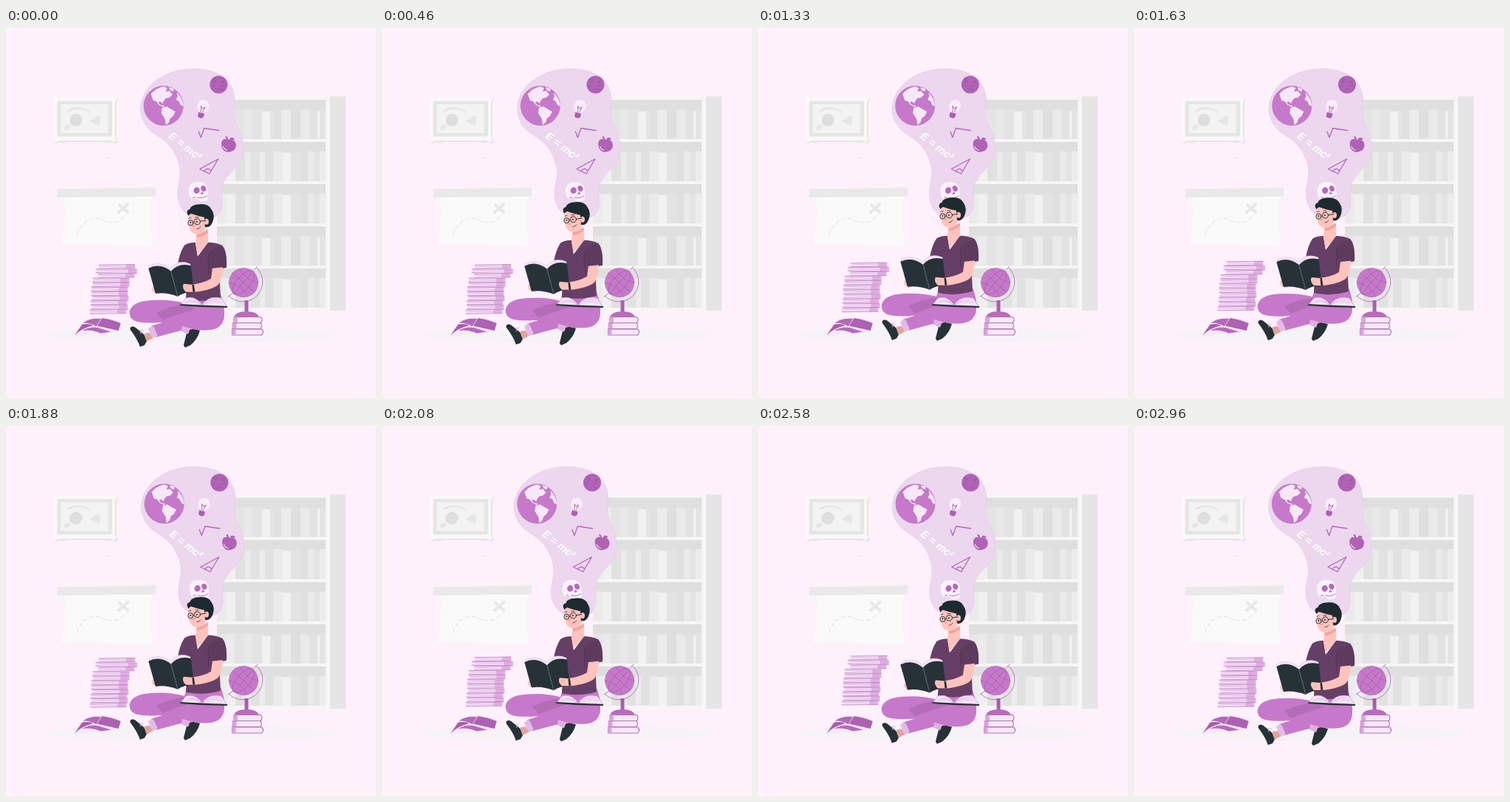
An HTML page that plays this animation: 500x500 px, repeating every 3000 ms.

```html
<!DOCTYPE html>
<html lang="en">
<head>
<meta charset="utf-8">
<title>Reading and thinking</title>
<style>
  html, body { margin: 0; width: 100%; height: 100%; overflow: hidden; background: #fff1fb; }
  svg { display: block; width: 100vw; height: 100vh; }
  text { font: italic bold 14.5px "Liberation Sans", Arial, sans-serif; }
  .line { fill: none; stroke-linecap: round; stroke-linejoin: round; }
</style>
</head>
<body>
<svg viewBox="0 0 500 500">
  <path d="M38 54.500H458M38 54.500V338" class="line" stroke="#fbeef7" stroke-width=".6"/>
  <ellipse cx="250.500" cy="415" rx="192" ry="11" fill="#f5f3f5"/>

  <g id="bookcase"></g>

  <g id="picture">
    <path id="frame" d="M64 94Q68 92 71 95H143Q147 91 150 95Q151 98 148 101V147Q152 151 148 155Q145 156 142 153Q136 156 130 153H82Q76 156 72 153Q67 157 64 153Q63 150 66 147V101Q62 97 64 94Z" fill="#e8e6e7" transform="translate(1 1)"/>
    <use href="#frame" id="frame-face" transform="translate(-1 -1)" opacity="0"/>
    <path d="M64 94Q68 92 71 95H143Q147 91 149 95Q150 98 147 101V147Q150 151 147 154Q145 155 142 152H72Q67 156 64 153Q63 150 66 147V101Q62 97 64 94Z" fill="#faf9fa"/>
    <path d="M69 98.500H143.500V146.500H69Z" fill="#e5e5e5"/>
    <path d="M74 103H138.500V142H74Z" fill="#f3f3f3"/>
    <circle cx="94.500" cy="124.500" r="8.500" fill="#dedede"/>
    <path d="M112 126L127 117V132.500Z" fill="#e6e6e6"/>
    <path class="line" d="M84 112Q98 104 112 113" stroke="#e6e6e6" stroke-width="2.500"/>
    <ellipse cx="83" cy="134" rx="4.500" ry="3" fill="#e6e6e6" transform="rotate(-25 83 134)"/>
  </g>

  <g id="map">
    <path class="line" d="M97 217L138 175L180 216" stroke="#f9eff6" stroke-width=".8"/>
    <path d="M136 174.500L140 175.500" stroke="#ddd5da"/>
    <path d="M79 228H197Q193 262 199 296Q180 292 155 294Q110 290 75 293Q81 260 79 228Z" fill="#fafafa"/>
    <path d="M69 217.500L202 215.500V227.500L69 229Z" fill="#e9e9e9"/>
    <path class="line" d="M96 279C103 259 117 254 128 259S152 267 162 252" stroke="#e6e6e6" stroke-width="1.400" stroke-dasharray="5 4"/>
    <path d="M152 238L166 250M166 237L151 250" stroke="#e8e8e8" stroke-width="4"/>
  </g>

  <g id="thought">
    <path d="M182 114C179 83 210 55 254 55C287 55 309 71 309 97C307 122 309 125 314 135C320 146 322 158 320 169C317 188 302 192 294 209C289 221 294 231 292 241Q290 253 280 256H255C240 252 232 240 232 224C232 212 237 202 235 189C232 172 224 159 210 149C197 141 185 133 182 114Z" fill="#ecd7ee" stroke="#dfc7e1" stroke-width=".5"/>

    <circle cx="213" cy="105" r="27" fill="#c679ca"/>
    <g fill="#f7e8f8">
      <path d="M196 89Q203 81 213 79L218 81L216 86L221 85L225 90L221 94L216 95L213 99L212 102L208 99L206 101L209 104L214 105L213 107L207 104L203 99L199 98Z"/>
      <path d="M211 108L217 106L222 109L229 113L226 119L222 122L220 128L216 131L215 123L210 115Z"/>
      <path d="M231 87Q239 95 240 106L236 104L234 99L230 97L232 92Z"/>
      <path d="M220 80L227 82L226 86L222 84Z"/>
    </g>

    <circle cx="287.500" cy="76.500" r="12" fill="#b062b5"/>
    <g class="line" stroke="#9d55a2" stroke-width="1">
      <circle cx="282" cy="71" r="1.800"/><circle cx="293" cy="73" r="1.300"/>
      <path d="M278 80L282 77M285 84L288 82L292 84M290 79L295 77"/>
    </g>

    <g transform="rotate(14 266 108)">
      <path d="M262 114Q258 109 258 105A8 8 0 0 1 274 105Q274 109 270 114Z" fill="#f9edfa"/>
      <path class="line" d="M265 114L263 106L266 109L269 106L267 114" stroke="#b878bc"/>
      <path d="M262 115H270V120L268 122H264L262 120Z" fill="#ad5fb3"/>
    </g>

    <g class="line" stroke="#b565bb" stroke-width="1.300">
      <path d="M260.500 140L263.500 148L268 135.500L288 138.500"/>
      <path d="M262 190.500L287 177L275 197ZM268 194Q270 190 274 190.500L277 193"/>
    </g>

    <g fill="#b062b5">
      <path d="M300 151Q294 148 291.500 154Q290 161 295 166Q299 169 304 167Q311 165 311 158Q310 149 300 151Z"/>
      <path d="M299 151Q296 148 297 146L299 147L301 151Z"/>
      <path d="M302 150Q305 146 309 150Q306 153 302 150Z"/>
    </g>
    <path class="line" d="M293.500 160Q295 164.500 299 165" stroke="#efd8f1" stroke-width="1.200"/>

    <g id="skull">
      <path d="M247 219Q248 208 260 208Q272 208 273 219L273 231Q270 235 262 234L258 230Q252 233 249 229Q247 225 247 219Z" fill="#faf1fb"/>
      <g fill="#b668bc">
        <ellipse cx="258" cy="219.500" rx="4" ry="4.400" transform="rotate(25 258 219)"/>
        <ellipse cx="267" cy="217" rx="3.400" ry="4" transform="rotate(-25 267 217)"/>
        <path d="M265 221L267.500 224L263 225Z"/>
      </g>
      <path class="line" d="M253 230L254 228L256 230M259 229Q266 231 272 227" stroke="#b668bc" stroke-width=".9"/>
    </g>
    <text transform="translate(219 147.500) rotate(38)" fill="#fff">E = mc²</text>
  </g>

  <g id="stack"></g>

  <g id="fallen">
    <path d="M92 417L103 398Q114 390 130 391Q144 393 155.500 398L152 410L141 412L128 415Q117 410 107 415Z" fill="#f7e7f8"/>
    <path d="M92.500 415.500L103 400.500Q112 399 118 402Q103 405 92.500 415.500Z" fill="#a85dad"/>
    <path d="M104 398.500Q113 391.500 128.500 393L122 403Q113 398 104 398.500Z" fill="#b468b9"/>
    <path d="M130 392Q144 394 155 399L152 409Q139 406 123 402.500Z" fill="#ad61b2"/>
    <path d="M103 409Q113 403 124 405L142 410.500L128 412.500Q115 407 103 409Z" fill="#b56abb"/>
  </g>

  <g id="globe">
    <circle cx="321" cy="344" r="20" fill="#c679ca"/>
    <g class="line" stroke="#a862ad" stroke-width=".9">
      <ellipse cx="321" cy="344" rx="9" ry="20" transform="rotate(42 321 344)"/>
      <path d="M334 329L308 359M306 331L336 357M316 325Q323 341 341 344M301 344Q320 347 326 363"/>
    </g>
    <path class="line" d="M336 326L340 322M339 324A26.500 26.500 0 1 1 301 362M300 363L307 358" stroke="#bd7cc1"/>
    <path d="M322.500 368H327.500V385H322.500Z" fill="#a85eae"/>
    <path d="M308 391Q310 383 325 383Q340 383 342 391Z" fill="#b86cbd"/>
  </g>

  <g id="reader">
    <path d="M187 413L194 412L199 419L190 424ZM242 405L252 402L254 411L245 412Z" fill="#e3a39a"/>
    <path d="M168 405Q171 402 175 405L187 415L190 424L187 429L181 431Q178 421 168 408Z" fill="#263238"/>
    <path d="M245 409L253 407L262 409Q259 421 249 429L242 432L240 429Z" fill="#263238"/>
    <path class="line" d="M180 408L186 413M182 413Q180 406 186 409M239 407L247 411M235 409Q240 405 244 412" stroke="#d9b6db" stroke-width=".9"/>
    <path d="M203 368Q220 367 241 372L245 360H290Q296 375 295 389Q294 405 278 408Q262 410 248 406L203 418L196 403L212 398Q185 400 174 396Q166 392 167 383Q171 368 203 368Z" fill="#c679ca"/>
    <path d="M203 385Q222 376 243 373L256 380Q232 387 212 395Z" fill="#b26db6"/>
    <path d="M238 403L249 406L246 414L237 410Z" fill="#dfb0e2"/>
    <path d="M192 406L199 403L205 416L198 420Z" fill="#e4bbe7"/>

    <path d="M240 318L236 337L222 343L198 350Q195 357 203 359L224 356L246 345Z" fill="#ffc3bd"/>
    <path d="M256 290Q246 290 241 294Q234 305 232 321L245 326L243 367Q267 372 290 365L288 326L298 324Q299 302 292 294Q284 290 273 290L259 309Z" fill="#663f66"/>
    <path d="M275 301Q271 315 274 324L288 326L298 324Q299 302 292 294Z" fill="#5d395d" opacity=".7"/>
    <path class="line" d="M274 305Q272 317 275 333" stroke="#4c2e4b" stroke-width=".7"/>
    <path d="M256 291L258 274H273V290L258.500 307Z" fill="#ffc3bd"/>
    <path d="M258 279Q267 279 272 272L273 277Q265 283 258 283Z" fill="#f2a49c"/>
    <path d="M248 251Q245 268 250 275Q256 281 263 278Q271 273 274 262L273 249Z" fill="#ffc3bd"/>
    <path d="M246.500 254Q242 247 248.500 245Q250 239 261 238.500Q274 237 278 246Q283 253 279 263Q275 271 269 269L268 256Q258 254 250 251Q248 252 246.500 254Z" fill="#1d2b31"/>
    <ellipse cx="271" cy="262" rx="3" ry="4" fill="#ffc3bd"/>
    <g class="line" stroke="#243038">
      <circle cx="249.500" cy="263.500" r="3.600"/><circle cx="258.500" cy="262" r="4"/>
      <path d="M262.500 261.500L270 260.500"/>
      <path d="M258 272Q261 272 263 269M247 257.500L250 256.500M256 256L260 256" stroke-width=".8"/>
    </g>
    <circle cx="249.500" cy="263" r=".9"/><circle cx="258" cy="262" r=".9"/>
    <ellipse cx="253.500" cy="268" rx="1.600" ry="1.200" fill="#f59b94"/>

    <path d="M193 322Q208 314 222 325Q233 312 249 319L253 356Q240 356 230 361Q216 355 204 360Z" fill="#f5e3f6" stroke="#d3acd6" stroke-width=".4"/>
    <path d="M192.500 325Q208 317 223 329L232 363Q217 357 202 359Z" fill="#263238"/>
    <path d="M223 329Q233 317 250 321.500L254 357Q240 357 232 363Z" fill="#263238"/>
    <path d="M223 329L232 363" stroke="#65717a" stroke-width="1.100" stroke-dasharray="2 1"/>
    <path d="M279 325L293 323.500Q292 340 287 347Q279 354 256 357L243 357Q237 351 240 346L251 347Q267 345 277 339Z" fill="#ffc3bd"/>
    <path class="line" d="M240 350L247 349M241 353L247 352" stroke="#eda59c" stroke-width=".6"/>
    <path d="M251.500 347L254 347L255.500 357L252.500 357Z" fill="#263238"/>
  </g>

  <g id="lap-book">
    <path d="M236 374L243 365Q255 361 265 374Q274 361 291 365L298 376Z" fill="#f4e4f6" stroke="#c892cc" stroke-width=".6"/>
    <path class="line" d="M242 371Q255 367 264 374M247 368Q257 367 264 374M266 374Q275 367 292 371M266 374Q274 365 289 367" stroke="#d3a8d6" stroke-width=".6"/>
    <path d="M235.500 373L263 374.500L299 376V378L263 377L235.500 375Z" fill="#263238"/>
  </g>
</svg>

<script>
  const LOOP = 3000, FPS = 24, STEP = 1000 / FPS;
  const byId = id => document.getElementById(id);
  const rect = (x, y, w, h, fill) =>
    `<rect x="${x}" y="${y}" width="${w}" height="${h}" fill="${fill}"/>`;

  // Each volume: left edge, shade, gap above it.
  const rows = {
    a: [[285, '#e6e6e6', 1], [297, '#ebebeb', 0], [309, '#e4e4e4', 1], [321, '#e8e8e8', 0],
        [333, '#e3e3e3', 0], [346, '#f2f2f2', 3], [357, '#e4e4e4', 2], [361, '#e0e0e0', 0],
        [372, '#ececec', 1], [385, '#dfdfdf', 0], [398, '#eaeaea', 1], [410, '#e2e2e2', 0],
        [421, '#f3f3f3', 2], [424, '#e4e4e4', 0]],
    b: [[285, '#ebebeb', 0], [298, '#f0f0f0', 1], [310, '#e1e1e1', 0], [323, '#eaeaea', 1],
        [331, '#e2e2e2', 0], [343, '#ececec', 1], [350, '#e1e1e1', 0], [361, '#eaeaea', 0],
        [374, '#f2f2f2', 2], [385, '#e3e3e3', 0], [399, '#dfdfdf', 1], [408, '#eaeaea', 0],
        [416, '#e4e4e4', 1], [424, '#ececec', 0]]
  };

  function drawBookcase() {
    let out = rect(285, 92.5, 153, 289.5, '#f7f5f6') + rect(438, 92.5, 21, 289.5, '#e5e5e5');
    [...'abbab'].forEach((kind, i) => {
      const top = 97 + i * 57, height = 53;
      out += rect(285, top, 147, height, '#dfdfdf');
      rows[kind].forEach(([x, shade, gap], n, all) => {
        const end = n + 1 < all.length ? all[n + 1][0] : 432;
        out += rect(x, top + 12.5 + gap, end - x, height - 12.5 - gap, shade);
      });
    });
    byId('bookcase').innerHTML = out;
  }

  function drawStack() {
    const lefts = [125, 121, 124, 117, 117, 115, 115, 116, 114, 115, 113];
    byId('stack').innerHTML = lefts.map((x, i) => {
      const w = i === 1 ? 56 : 49.5, y = 319.5 + i * 6.1;
      const tilt = i % 2 ? 0.8 : -0.6;
      return `<g transform="translate(${x} ${y}) rotate(${tilt} 25 3)">` +
        rect(0, 0, w, 5.7, '#f3e1f5') + rect(w - 12, 0, 12, 5.7, '#dfb2e2') +
        `<path d="M0 .4H${w}M0 5.4H${w}" stroke="#c47fc8" stroke-width=".8"/>` +
        `<path d="M2 2L${w - 4} 3.4" stroke="#d6a3da" stroke-width=".6"/></g>`;
    }).reverse().join('');
  }

  function drawGlobeBooks() {
    const books = [[308, 390.5, 39], [306.5, 398.5, 40], [305.5, 407, 43]];
    byId('globe').innerHTML += books.map(([x, y, w]) =>
      `<path d="M${x} ${y}h${w - 3}q4 3.800 0 8h${-w + 3}z" fill="#f7e8f8" stroke="#b96fbe" stroke-width="1.100"/>` +
      rect(x, y, 5, 8, '#d8a5dc')).join('');
  }

  // Rises 10 units and returns, after an optional delay.
  function floatY(ms, delay = 0) {
    if (ms < delay) return 0;
    const p = (ms - delay) % LOOP / LOOP;
    return -10 * (1 - Math.abs(2 * p - 1));
  }

  const sway = [0, -1, 2, -4, 4, -4, 4, -4, 2, -1, 0];
  function swayX(ms) {
    const p = ms % LOOP / LOOP * 10, i = Math.floor(p);
    return sway[i] + (sway[i + 1] - sway[i]) * (p - i);
  }

  const move = (id, x, y) => byId(id).setAttribute('transform', `translate(${x} ${y})`);

  function render(ms) {
    const frame = Math.floor((ms % LOOP + 5) / STEP) % (LOOP / STEP);
    const t = (frame + 1) * STEP;
    move('reader', 0, floatY(t));
    move('stack', 0, floatY(t, 1000));
    move('thought', swayX(t), 0);
  }

  drawBookcase();
  drawStack();
  drawGlobeBooks();

  const start = performance.now();
  function tick() {
    render(performance.now() - start);
    requestAnimationFrame(tick);
  }
  tick();
</script>
</body>
</html>
```
